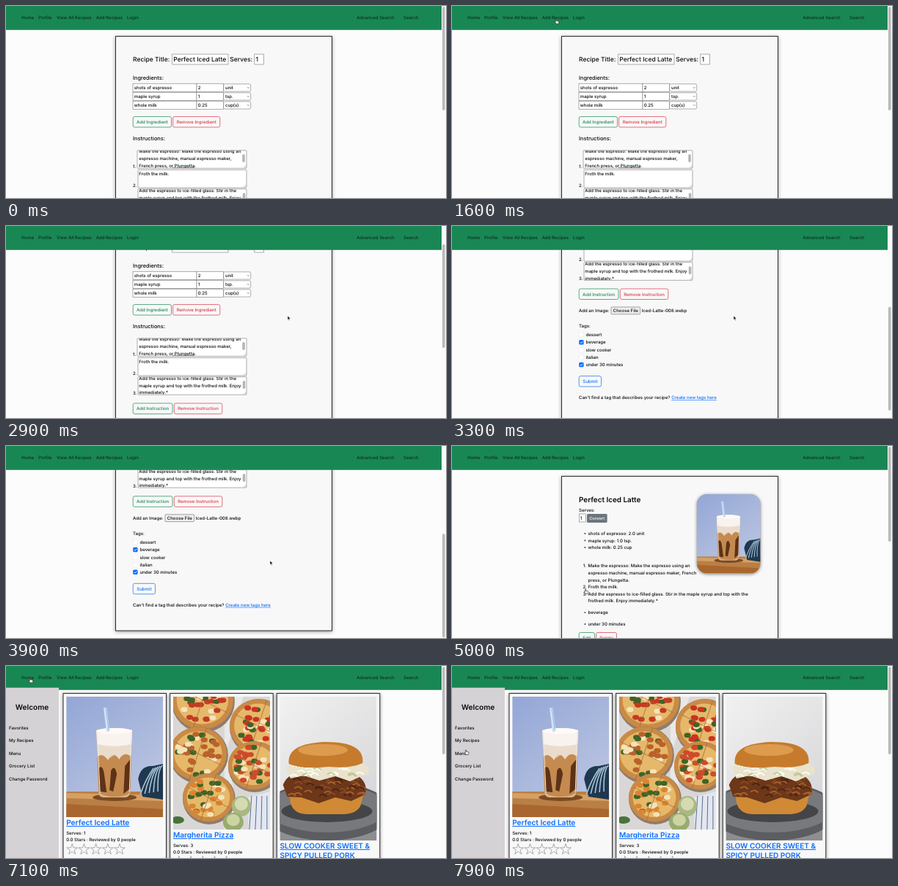
These frames come from a looping animation (600x263 px, 8000 ms). An HTML page:

```html
<!DOCTYPE html>
<html lang="en">
<head>
<meta charset="utf-8">
<title>Recipe site walkthrough</title>
<style>
  html, body { margin: 0; width: 100%; height: 100%; overflow: hidden; background: #fff; }
  svg { display: block; width: 100vw; height: 100vh; }
  text { font: 450 6.05px Inter, "Open Sans", sans-serif; fill: #080a0c; white-space: pre; text-rendering: geometricPrecision; }
  .medium { font-weight: 550; }
  .section { font-size: 7.4px; font-weight: 550; }
  .field { font-size: 8.5px; }
  .label { font-size: 8.5px; font-weight: 550; }
  .title { font-size: 9.9px; font-weight: 600; }
  .card-title { font-size: 10.1px; font-weight: 600; }
  .link { fill: #0d6efd; text-decoration: underline; }
  .small { font-size: 5.5px; fill: #fff; }
  .nav { fill: #0b2f1e; }
  .card { fill: #f8f8f8; stroke: #2a2a2a; stroke-width: 1; filter: drop-shadow(0 1px 2.5px rgba(0,0,0,.4)); }
  .input { fill: #fff; stroke: #777; stroke-width: .6; }
  #submit.hover rect { fill: #0d6efd; }
  #submit.hover text { fill: #fff !important; }
</style>
</head>
<body>
<svg id="stage" viewBox="0 0 600 263" preserveAspectRatio="none"></svg>
<script>
const GREEN = '#198754', RED = '#dc3545', BLUE = '#0d6efd';

// ---- markup helpers ----
const text = (x, y, str, cls = '') => `<text x="${x}" y="${y}" class="${cls}">${str}</text>`;
const rect = (x, y, w, h, attrs = '') => `<rect x="${x}" y="${y}" width="${w}" height="${h}" ${attrs}/>`;
const ellipse = (x, y, rx, ry, fill) => `<ellipse cx="${x}" cy="${y}" rx="${rx}" ry="${ry}" fill="${fill}"/>`;
const path = (d, fill, attrs = '') => `<path d="${d}" fill="${fill}" ${attrs}/>`;
const line = (d, stroke, width = 1) => path(d, 'none', `stroke="${stroke}" stroke-width="${width}"`);
const input = (x, y, w, h, r = 0) => rect(x, y, w, h, `class="input" rx="${r}"`);
const repeat = (n, draw) => Array.from({ length: n }, (_, i) => draw(i)).join('');
const photo = (id, x, y, w, h) => `<use href="#${id}" x="${x}" y="${y}" width="${w}" height="${h}"/>`;
const button = (x, y, w, str, color) =>
  rect(x, y, w, 14.5, `rx="2.3" fill="transparent" stroke="${color}" stroke-width=".7"`) +
  `<text x="${x + w / 2}" y="${y + 9.6}" text-anchor="middle" style="fill:${color}">${str}</text>`;

function random(seed) {
  return () => (seed = seed * 16807 % 2147483647) / 2147483647;
}

// ---- pictures ----
function latte() {
  return rect(0, 0, 132, 165, 'fill="url(#wall)"') +
    rect(0, 130, 132, 35, 'fill="#b97f45"') +
    path('M0 132L132 135V143L0 139Z', '#d6a064') + path('M0 147L132 154V165H0Z', '#a9672f') +
    path('M98 113Q101 94 118 95L132 92V141L104 137Z', '#1f3850') +
    repeat(5, i => line(`M${101 + i * 6} ${134 - i}Q${108 + i * 4} ${113 - i * 3} ${119 + i * 3} ${98 - i}`, '#a8c3d5', 1.6)) +
    ellipse(66, 138, 30, 5, '#7c4a22') +
    path('M41 47H90L87 132Q86 138 79 138H52Q45 138 44 132Z', '#d9b78f') +
    path('M42 82Q52 76 60 84Q72 74 89 80L87 131Q82 137 66 137Q48 137 44 130Z', '#c48a50') +
    path('M44 98Q50 92 52 108L55 131L46 130ZM61 101Q66 92 69 106L64 130L59 128ZM80 95L87 86V126L78 133Z', '#5e3217') +
    path('M41 46Q65 40 90 46L88 82Q79 74 72 86Q64 73 57 87Q49 76 43 82Z', '#eadccd') +
    path('M41 46Q65 40 90 46L89 65Q66 71 42 65Z', '#f8f3ee') +
    ellipse(65.5, 47, 24, 4, '#fffaf5') +
    line('M53 15L57 48', '#cfe2f6', 4.5) + line('M54 15L58 46', '#8fb5e4', 1) +
    line('M42 48L46 132M89 48L86 131', '#eee5df', 1);
}

function pizza(x, y, r, topping, seed) {
  const next = random(seed);
  return ellipse(x + 1, y + 2, r + 1, r, '#8f7c6d') + ellipse(x, y, r, r * .94, '#c98a45') +
    ellipse(x, y, r * .84, r * .78, '#e6b86a') +
    repeat(38, i => {
      const angle = next() * 6.28, d = Math.sqrt(next()) * r * .74;
      const color = i % 4 === 3 ? '#3f6428' : i % 4 === 2 ? '#f4e3ba' : topping;
      return ellipse((x + Math.cos(angle) * d).toFixed(1), (y + Math.sin(angle) * d).toFixed(1), 4.6, 3.4, color);
    }) +
    line(`M${x - r * .8} ${y - r * .4}L${x + r * .8} ${y + r * .4}M${x + r * .3} ${y - r * .9}L${x - r * .3} ${y + r * .9}`, '#a86a35', .8);
}

function pizzas() {
  return rect(0, 0, 132, 182, 'fill="#d9d7d6"') + path('M70 0L96 0L72 75L94 182H70Z', '#e9e8e8') +
    pizza(40, 5, 42, '#c43a22', 11) + pizza(116, 40, 39, '#cc3323', 29) +
    pizza(34, 78, 39, '#b9622a', 47) + pizza(110, 94, 35, '#cf4a2b', 59) +
    pizza(48, 138, 35, '#dd8430', 71) +
    path('M102 138L132 130V182H103Z', '#e4e7ee') +
    repeat(4, i => line(`M${107 + i * 7} 136L${104 + i * 8} 182`, '#536e9b', 1)) +
    ellipse(93, 150, 13, 14, '#a9b884') + ellipse(93, 147, 9, 9, '#d6dab0') +
    ellipse(82, 172, 14, 13, '#98ac70') + ellipse(82, 169, 9, 8, '#cdd4a2') + ellipse(6, 169, 9, 5, '#48733a');
}

function burger() {
  const next = random(83);
  const strands = (n, y, spread, colors) => repeat(n, i =>
    line(`M${(16 + next() * 86).toFixed(1)} ${(y + next() * spread).toFixed(1)}q5 -5 9 1`, colors[i % colors.length], 1.8));
  return rect(0, 0, 132, 197, 'fill="url(#haze)"') + rect(0, 150, 132, 47, 'fill="#8d8e91"') +
    ellipse(64, 157, 88, 40, '#5b5d61') + ellipse(64, 153, 82, 33, '#77797d') + ellipse(64, 157, 62, 15, '#444548') +
    '<g transform="translate(-7) scale(1.13 1)">' +
    path('M17 128H108L104 148Q100 160 84 161H38Q22 160 19 145Z', '#d08a35') +
    path('M10 121Q16 102 37 107Q64 97 101 109Q113 119 109 134L92 143L73 138L53 146L32 138L15 137Z', '#6d3719') +
    strands(38, 113, 24, ['#a9622f', '#4a2212', '#8b4a22']) +
    path('M13 96Q30 84 61 87Q99 83 113 97Q116 108 106 108L91 116L73 109L54 115L35 108L19 112Z', '#e9e3cd') +
    strands(26, 93, 17, ['#fffdf1', '#c3c894', '#fffdf1']) +
    path('M17 92Q14 64 61 62Q109 62 106 91Q91 99 65 96Q32 100 17 92Z', '#c67b2c') +
    ellipse(58, 73, 30, 8, '#dd9b4e') + '</g>';
}

// ---- pages ----
const textarea = (n, x, y, lines, firstBaseline) =>
  input(x, y, 328 - x, 24.5, .8) +
  `<svg x="${x}" y="${y + .4}" width="148" height="23.7" viewBox="${x} ${y + .4} 148 23.7">` +
  lines.map((str, i) => text(181.3, firstBaseline + i * 9.7, str)).join('') + '</svg>' +
  line(`M324 ${y + 24}l3.5 -3.5M326 ${y + 24}l1.5 -1.5`, '#888', .5) + text(173, y + 24, `${n}.`);

function ingredientRow(i, name, amount, unit) {
  const y = 106.2 + i * 12;
  return input(173, y, 87, 11.3) + input(260, y, 36.5, 11.3) + input(296.7, y + .6, 37, 10.2, 1.8) +
    text(174.8, y + 7.9, name) + text(261.8, y + 7.9, amount) + text(299, y + 7.9, unit) +
    line(`M328.8 ${y + 5}l1.4 1.4l1.4 -1.4`, '#444', .6);
}

function checkbox(y, str, checked) {
  const box = checked ? `fill="${BLUE}"` : 'fill="#fff" stroke="#ddd" stroke-width=".4"';
  return rect(173.2, y - 3.2, 6.4, 6.4, `rx="1.5" ${box}`) +
    (checked ? line(`M174.8 ${y}l1.3 1.3l2.2 -2.5`, '#fff', .9) : '') + text(182.5, y + 2.2, str);
}

const formPage = () =>
  rect(149.5, 41.5, 295, 429.5, 'class="card"') +
  text(173, 76, 'Recipe Title:', 'label') + input(226.7, 66, 76.3, 14) + text(228.3, 76, 'Perfect Iced Latte', 'field') +
  text(305.3, 76, 'Serves:', 'label') + input(338.8, 66, 12.7, 14) + text(340.5, 76, '1', 'field') +
  text(173, 100.7, 'Ingredients:', 'section') +
  ingredientRow(0, 'shots of espresso', '2', 'unit') +
  ingredientRow(1, 'maple syrup', '1', 'tsp.') +
  ingredientRow(2, 'whole milk', '0.25', 'cup(s)') +
  button(173.2, 151.5, 52.3, 'Add Ingredient', GREEN) + button(227.6, 151.5, 64.2, 'Remove Ingredient', RED) +
  text(173, 183.6, 'Instructions:', 'section') +
  textarea(1, 179, 197.8, ['Make the espresso: Make the espresso using an', 'espresso machine, manual espresso maker,', 'French press, or Plungetta.'], 201.2) +
  line('M227 221.5H257', '#e33', .6) + rect(322.3, 203, 3.5, 11, 'rx="1.7" fill="#b5b5b5"') +
  textarea(2, 180, 224.4, ['Froth the milk.'], 232.3) +
  textarea(3, 180, 250.6, ['Add the espresso to ice-filled glass. Stir in the', 'maple syrup and top with the frothed milk. Enjoy', 'immediately.*'], 255) +
  rect(322.8, 256, 3.5, 11, 'rx="1.7" fill="#b5b5b5"') +
  button(173.2, 286.8, 53.8, 'Add Instruction', GREEN) + button(229.3, 286.8, 65.5, 'Remove Instruction', RED) +
  text(173, 318.5, 'Add an Image:', 'medium') +
  rect(217, 311.8, 39.5, 9.8, 'rx="1" fill="#efefef" stroke="#666" stroke-width=".6"') +
  text(219.8, 318.6, 'Choose File') + text(258.5, 318.6, 'Iced-Latte-008.webp') +
  text(173, 340, 'Tags:', 'medium') +
  ['dessert', 'beverage', 'slow cooker', 'italian', 'under 30 minutes']
    .map((tag, i) => checkbox(349.8 + i * 10.25, tag, i === 1 || i === 4)).join('') +
  `<g id="submit">${button(173.2, 406.3, 30.3, 'Submit', BLUE)}</g>` +
  text(173, 437.8, 'Can\'t find a tag that describes your recipe? <tspan class="link">Create new tags here</tspan>');

const bullet = (y, str) => ellipse(181.4, y - 2.1, .9, .9, '#222') + text(185.6, y, str);

const recipePage = () =>
  rect(149.5, 41.5, 295, 300, 'class="card"') +
  text(173, 76.8, 'Perfect Iced Latte', 'title') + text(173, 89.8, 'Serves:') +
  input(173.3, 93, 9, 11) + text(174.8, 101, '1') +
  rect(184, 93, 27.6, 12, 'rx="1.5" fill="#6c757d"') + text(187.2, 101, 'Convert', 'small') +
  rect(334, 66, 86.5, 108.5, 'rx="14" fill="#aab" style="filter:drop-shadow(0 1px 2px rgba(0,0,0,.5))"') +
  `<g clip-path="url(#rounded)">${photo('latte', 333.8, 66, 87, 108.5)}</g>` +
  bullet(122, 'shots of espresso: 2.0 unit') + bullet(131.5, 'maple syrup: 1.0 tsp.') + bullet(141, 'whole milk: 0.25 cup') +
  text(178.8, 166.4, '1.') + text(178.4, 195.2, '2.') + text(178.4, 204.8, '3.') +
  ['Make the espresso: Make the espresso using an', 'espresso machine, manual espresso maker, French', 'press, or Plungetta.',
    'Froth the milk.', 'Add the espresso to ice-filled glass. Stir in the maple syrup and top with the', 'frothed milk. Enjoy immediately.*']
    .map((str, i) => text(185.6, 166.4 + i * 9.6, str)).join('') +
  bullet(230.2, 'beverage') + bullet(246, 'under 30 minutes') +
  button(173.2, 255.5, 21.3, 'Edit', GREEN) + button(196.7, 255.5, 27.8, 'Delete', RED);

function star(x, y) {
  const points = repeat(10, i => {
    const r = i % 2 ? 3 : 7.8, a = i * Math.PI / 5;
    return `${(x + r * Math.sin(a)).toFixed(2)},${(y - r * Math.cos(a)).toFixed(2)} `;
  });
  return `<polygon points="${points}" fill="none" stroke="#777" stroke-width=".6"/>`;
}

function recipeCard(x, id, height, titles, serves) {
  const bottom = 42 + height, end = bottom + titles.length * 13.3;
  return rect(x, 37.5, 140.5, 300, 'class="card"') + photo(id, x + 4.2, 42, 132, height) +
    titles.map((str, i) => text(x + 4.2, bottom + 11 + i * 13.3, str, 'card-title link')).join('') +
    text(x + 4.2, end + 10.6, `Serves: ${serves}`) +
    text(x + 4.2, end + 20, '0.0 Stars : Reviewed by 0 people') +
    repeat(5, i => star(x + 12.2 + i * 16.2, end + 31));
}

const homePage = () =>
  rect(0, 29.7, 72, 234, 'fill="#d4d2d4"') + text(12.8, 60.3, 'Welcome', 'card-title') +
  ['Favorites', 'My Recipes', 'Menu', 'Grocery List', 'Change Password']
    .map((str, i) => text(4, 86.7 + i * 17.55, str)).join('') +
  recipeCard(78, 'latte', 165, ['Perfect Iced Latte'], 1) +
  recipeCard(223.7, 'pizzas', 182, ['Margherita Pizza'], 3) +
  recipeCard(369.3, 'burger', 197, ['SLOW COOKER SWEET &amp;', 'SPICY PULLED PORK'], 8);

const navLinks = [[21, 'Home'], [44, 'Profile'], [69, 'View All Recipes'], [122.7, 'Add Recipes'], [165, 'Login'], [478.3, 'Advanced Search'], [542, 'Search']];
const gradient = (id, from, to) =>
  `<linearGradient id="${id}" x2=".6" y2="1"><stop stop-color="${from}"/><stop offset="1" stop-color="${to}"/></linearGradient>`;
const symbol = (id, height, art) =>
  `<symbol id="${id}" viewBox="0 0 132 ${height}" preserveAspectRatio="none">${art}</symbol>`;

const $ = id => document.getElementById(id);
$('stage').innerHTML =
  `<defs>${gradient('wall', '#93a6d6', '#bcc6e1')}${gradient('haze', '#f1f1f2', '#d6d6d8')}
   <clipPath id="rounded">${rect(334, 66, 86.5, 108.5, 'rx="14"')}</clipPath>
   ${symbol('latte', 165, latte())}${symbol('pizzas', 182, pizzas())}${symbol('burger', 197, burger())}</defs>` +
  rect(0, 0, 600, 263, 'fill="#fdfcfd"') +
  `<g id="form">${formPage()}</g><g id="recipe">${recipePage()}</g>` +
  rect(0, 0, 594, 32.8, `fill="${GREEN}"`) + navLinks.map(([x, str]) => text(x, 18.1, str, 'nav')).join('') +
  `<g id="home">${homePage()}</g>` +
  rect(594, 0, 6, 263, 'fill="#fafafa"') +
  rect(595, 1, 3.6, 142, 'id="thumb" rx="1.8" fill="#b9b9b9"') +
  `<g id="arrow">${path('M0 0V5.6L1.3 4.4L2.2 6.4L3.1 6L2.2 4.1H4Z', '#111', 'stroke="#fff" stroke-width=".5"')}</g>
   <g id="hand">${path('M-.6 -.8Q0 -1.4 .6 -.8V1.2L3.4 1.9Q4 2.2 3.8 3.2L3.2 5.4H.2L-2 2.8Q-1.8 1.8 -.6 2.8Z', '#fff', 'stroke="#111" stroke-width=".6"')}</g>`;

// ---- motion ----
const LOOP = 8000, MAX_SCROLL = 218;
const THUMB_HEIGHT = { form: 142, recipe: 130, home: 120 };
const cursorPath = [
  [100, 150, -10], [900, 143, 19], [1600, 142, 19], [2400, 384, 123], [3600, 384, 123], [3900, 360, 157],
  [4500, 182, 197], [5300, 182, 197], [5800, 444, 172], [6000, 444, 172], [6900, 33, 17.5], [7100, 33, 17.5], [7900, 19, 116]
];
const handTimes = [[800, 1700], [4400, 5350], [6800, 7150], [7700, LOOP]];
const clamp = v => Math.min(1, Math.max(0, v));
const smooth = p => p * p * (3 - 2 * p);
const cubic = p => p < .5 ? 4 * p ** 3 : 1 - 4 * (1 - p) ** 3;

function cursorAt(t) {
  const next = cursorPath.findIndex(key => key[0] >= t);
  if (next < 0) return cursorPath.at(-1).slice(1);
  const [t1, x1, y1] = cursorPath[next];
  const [t0, x0, y0] = cursorPath[Math.max(0, next - 1)];
  const p = t1 > t0 ? smooth(clamp((t - t0) / (t1 - t0))) : 0;
  return [x0 + (x1 - x0) * p, y0 + (y1 - y0) * p];
}

const show = (id, visible) => $(id).setAttribute('display', visible ? 'inline' : 'none');

function draw() {
  const t = Math.floor(performance.now() % LOOP / 100) * 100;
  const page = t < 5000 ? 'form' : t < 7000 ? 'recipe' : 'home';
  const scroll = page === 'form' ? MAX_SCROLL * cubic(clamp((t - 2490) / 1110)) : 0;
  for (const id of ['form', 'recipe', 'home']) show(id, id === page);
  $('form').setAttribute('transform', `translate(0 ${-scroll})`);
  $('submit').setAttribute('class', t >= 4400 ? 'hover' : '');
  $('thumb').setAttribute('y', 1 + scroll * .547);
  $('thumb').setAttribute('height', THUMB_HEIGHT[page]);

  const hand = handTimes.some(([from, to]) => t >= from && t < to);
  const [x, y] = cursorAt(t);
  show('hand', hand);
  show('arrow', !hand);
  $(hand ? 'hand' : 'arrow').setAttribute('transform', `translate(${x} ${y})`);
  requestAnimationFrame(draw);
}
draw();
</script>
</body>
</html>
```
